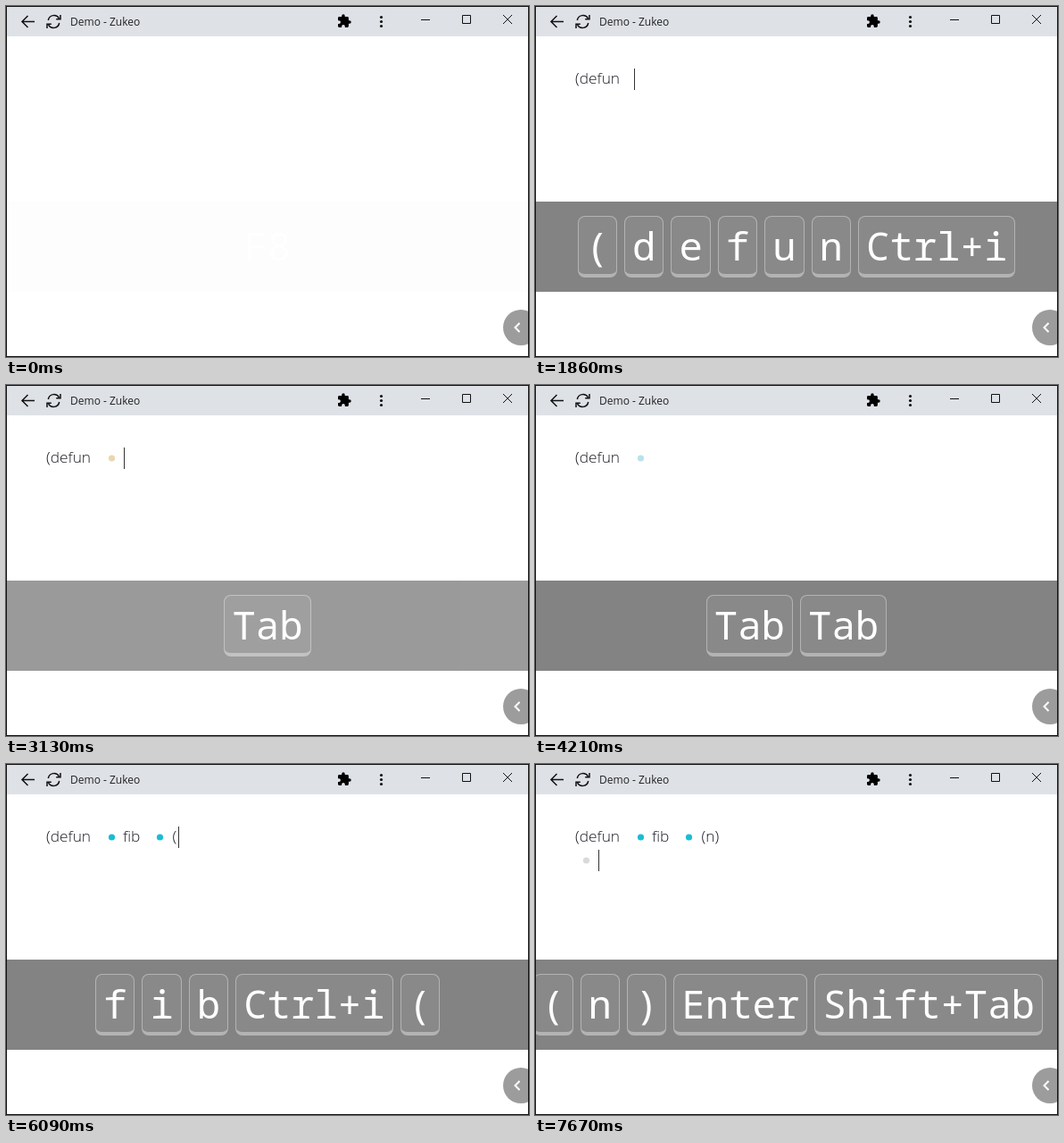
Recreate the animation shown at these times as an HTML page. Size 586 px wide and 393 px high, loop 8 s.

```html
<!DOCTYPE html>
<html lang="en">
<head>
<meta charset="utf-8">
<title>Typing demo</title>
<style>
html, body { margin: 0; width: 100%; height: 100%; overflow: hidden; background: #fff; }
svg { position: absolute; left: 0; top: 0; }
svg text { font: 300 17.3px "Open Sans", "Noto Sans", sans-serif; fill: #1c1c24; }
svg .title { font: 12px "Open Sans", "Noto Sans", sans-serif; fill: #222; }
#bar {
  position: absolute; left: 1px; top: 219px; width: 584px; height: 101px;
  box-sizing: border-box; padding: 16px 16px 0; overflow: hidden;
  display: flex; justify-content: center; align-items: flex-start;
  background: rgba(0, 0, 0, .485);
}
/* once the row is full, older keys leave on the left */
#keys { display: flex; justify-content: flex-end; gap: 8px; max-width: 100%; }
#keys span {
  flex: none; box-sizing: border-box; height: 69px; padding: 0 8px;
  border: 1px solid rgba(255, 255, 255, .36); border-bottom-width: 4px; border-radius: 8px;
  background: rgba(255, 255, 255, .05); color: #fff;
  font: 44px/65px "Noto Sans Mono", "DejaVu Sans Mono", monospace; white-space: pre;
}
</style>
</head>
<body>
<svg width="586" height="393" viewBox="0 0 586 393">
  <rect width="586" height="393" fill="#fff"/>
  <rect width="586" height="34" fill="#dee1e6"/>
  <g fill="none" stroke="#111" stroke-width="1.5">
    <path d="M32 17.5H18.5M24.5 11l-6.5 6.5 6.5 6.5"/>
    <path d="M47.3 16a6.6 6.6 0 0 1 12.2-2.2M59.700 19a6.600 6.600 0 0 1-12.200 2.200"/>
    <path d="M61 10v4.800h-4.800M46 25v-4.800h4.800"/>
    <path stroke-width="1" d="M465 15.500h10M511.500 10.500h9v9h-9zM557 10l10 10M567 10l-10 10"/>
  </g>
  <path transform="translate(370.600 8.600) scale(.7)" d="M20.500 11H19V7c0-1.100-.9-2-2-2h-4V3.500a2.500 2.500 0 0 0-5 0V5H4c-1.100 0-2 .9-2 2v3.800h1.500a2.700 2.700 0 0 1 0 5.400H2V20c0 1.100.9 2 2 2h3.800v-1.500a2.700 2.700 0 0 1 5.400 0V22H17c1.100 0 2-.9 2-2v-4h1.500a2.500 2.500 0 0 0 0-5z"/>
  <g fill="#111"><circle cx="420.500" cy="12.500" r="1.600"/><circle cx="420.500" cy="17.500" r="1.600"/><circle cx="420.500" cy="22.500" r="1.600"/></g>
  <text class="title" x="72" y="22">Demo - Zukeo</text>
  <text id="name" x="45" y="87"></text>
  <text id="func" x="131" y="87"></text>
  <text id="args" x="186.500" y="87"></text>
  <circle id="dot1" cx="118.500" cy="82" r="3.600"/>
  <circle id="dot2" cx="172.500" cy="82" r="3.600"/>
  <circle id="dot3" cy="108" r="3.600" fill="#dadada"/>
  <rect id="caret" width="1" height="24" fill="#333"/>
  <circle cx="577" cy="360" r="20" fill="#9c9c9c"/>
  <path d="M575.500 355l-5 5 5 5" fill="none" stroke="#fff" stroke-width="2"/>
  <rect x=".5" y=".5" width="585" height="392" fill="none" stroke="#111"/>
</svg>
<div id="bar"><div id="keys"></div></div>
<script>
const $ = id => document.getElementById(id);
const LOOP = 8000, TEAL = '#18bdd4';

// Each step changes only the listed parts of the state.
const steps = [
  [0, { keys: 'F8', bar: .016, caret: 0, row: 0, name: '', func: '', args: '', dot1: 'none', dot2: 'none', dot3: -9 }],
  [340, { keys: 'Shift', bar: .6, caret: 45 }],
  [400, { bar: 1 }],
  [540, { keys: '(', name: '(', caret: 51 }],
  [940, { keys: '( d e', name: '(de', caret: 71 }],
  [1140, { keys: '( d e f', name: '(def', caret: 76 }],
  [1230, { keys: '( d e f u', name: '(defu', caret: 86 }],
  [1330, { keys: '( d e f u n', name: '(defun', caret: 96 }],
  [1600, { keys: '( d e f u n Ctrl' }],
  [1860, { keys: '( d e f u n Ctrl+i', caret: 111 }],
  [2400, { caret: 0 }],
  [2660, { bar: .4 }],
  [2730, { bar: .016 }],
  [3130, { keys: 'Tab', bar: .81, caret: 132, dot1: '#ead6b0' }],
  [3200, { bar: 1 }],
  [3660, { keys: 'Tab Tab', dot1: '#b8e3ec' }],
  [4210, { caret: 0 }],
  [4410, { keys: 'f', func: 'f', caret: 136, dot1: TEAL }],
  [4540, { keys: 'f i', func: 'fi', caret: 141 }],
  [4670, { keys: 'f i b', func: 'fib', caret: 151 }],
  [5010, { keys: 'f i b Ctrl' }],
  [5200, { keys: 'f i b Ctrl+i', caret: 186, dot2: TEAL }],
  [5680, { caret: 0 }],
  [5820, { keys: 'f i b Ctrl+i Shift' }],
  [6090, { keys: 'f i b Ctrl+i (', args: '(', caret: 193 }],
  [6350, { keys: 'f i b Ctrl+i ( n', args: '(n', caret: 204 }],
  [6550, { keys: 'f i b Ctrl+i ( n Shift' }],
  [6680, { keys: 'f i b Ctrl+i ( n )', args: '(n)', caret: 210 }],
  [7010, { keys: 'f i b Ctrl+i ( n ) Enter', caret: 132, row: 1, dot3: 118.5 }],
  [7410, { keys: 'f i b Ctrl+i ( n ) Enter Shift' }],
  [7670, { keys: 'f i b Ctrl+i ( n ) Enter Shift+Tab', caret: 71, dot3: 57.5 }],
];

function draw(s) {
  for (const id of ['name', 'func', 'args']) $(id).textContent = s[id];
  for (const id of ['dot1', 'dot2']) $(id).setAttribute('fill', s[id]);
  $('dot3').setAttribute('cx', s.dot3);
  $('caret').setAttribute('x', s.caret || -9);
  $('caret').setAttribute('y', 70 + 26 * s.row);
  $('bar').style.opacity = s.bar;
  $('keys').replaceChildren(...s.keys.split(' ').map(key => {
    const cap = document.createElement('span');
    cap.textContent = key;
    return cap;
  }));
}

const start = performance.now();
let shown = 0;
function tick() {
  const t = (performance.now() - start) % LOOP;
  const past = steps.filter(([at]) => at <= t);
  if (past.length !== shown) {
    shown = past.length;
    draw(Object.assign({}, ...past.map(step => step[1])));
  }
  requestAnimationFrame(tick);
}
tick();
</script>
</body>
</html>
```
